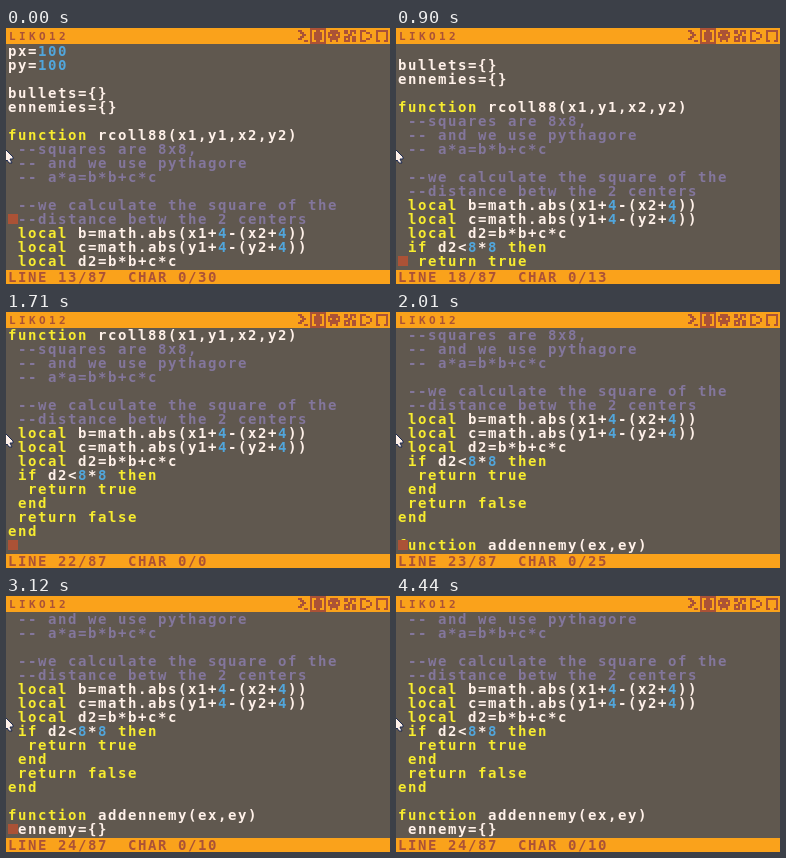
Animation of 384 by 256 pixels, one loop 4530 ms. Source, as an HTML page:

```html
<!DOCTYPE html>
<html lang="en">
<head>
<meta charset="utf-8">
<title>Code editor</title>
<style>
  html, body { margin: 0; width: 100%; height: 100%; overflow: hidden; background: #60584f; }
  svg { display: block; }
  text {
    font: bold 14px "DejaVu Sans Mono", monospace;
    letter-spacing: calc(10px - 1ch);
    white-space: pre;
    fill: #fff1e9;
  }
  .bar { fill: #faa21b; }
  .brown { fill: #ab5236; }
  .comment { fill: #83769c; }
  .keyword { fill: #f7ec2f; }
  .number { fill: #51a6dc; }
  .title { font-size: 11px; }
  .icons { fill: none; stroke: #ab5236; }
  .icons .active { stroke: #faa21b; }
</style>
</head>
<body>
<svg width="384" height="256" viewBox="0 0 384 256">
  <rect width="384" height="256" fill="#60584f"/>
  <g id="code"></g>
  <rect id="cursor" class="brown" x="2" width="10" height="10" shape-rendering="crispEdges"/>

  <rect class="bar" width="384" height="16"/>
  <text class="title brown" x="3" y="12">LIKO<tspan x="43">12</tspan></text>
  <g class="icons" transform="scale(2)" shape-rendering="crispEdges">
    <path d="M146 1.5h2m-1 1h2m-1 1h2m-3 1h2m-3 1h2m1 1h2"/>
    <rect class="brown" x="152" width="8" height="8" stroke="none"/>
    <path class="active" d="M155 1.5h-1.5v5h1.5M157 1.5h1.5v5h-1.5"/>
    <path d="M162 1.5h4M161 2.5h6M161 3.5h1m1 0h2m1 0h1M161 4.5h6M162 5.5h4M162 6.5h1m2 0h1"/>
    <path d="M169 1.5h2m1 0h3M169 2.5h2m1 0h1m1 0h1M171 3.5h2M169 4.5h3m1 0h2M169 5.5h1m1 0h1m1 0h2M169 6.5h3m1 0h2"/>
    <path d="M177.5 1v6M178 1.5h2m0 1h2m0 1h1m-1 1h1m-3 1h2m-4 1h2"/>
    <path d="M185 1.5h6M185.5 2v5M190.5 2v5M186 6.5h1m2 0h1"/>
  </g>

  <rect class="bar" y="242" width="384" height="14"/>
  <text id="status" class="brown" x="2" y="254"></text>
  <path d="M-2 120L7 129V131H4L6 135H3L1 132L-2 135Z" fill="#fff1e9" stroke="#1c2b53"/>
</svg>
<script>
const LINES = `px=100
py=100

bullets={}
ennemies={}

function rcoll88(x1,y1,x2,y2)
 --squares are 8x8,
 -- and we use pythagore
 -- a*a=b*b+c*c

 --we calculate the square of the
 --distance betw the 2 centers
 local b=math.abs(x1+4-(x2+4))
 local c=math.abs(y1+4-(y2+4))
 local d2=b*b+c*c
 if d2<8*8 then
  return true
 end
 return false
end

function addennemy(ex,ey)
 ennemy={}`.split("\n");

const DURATION = 4530, TOTAL_LINES = 87, ROWS = 16, ROW_HEIGHT = 14;
const FIRST_LINE = 13;
const MOVES = [450, 810, 840, 870, 900, 990, 1230, 1470, 1710, 2010, 2340];
const BLINKS = [270, 450, 2670, 3120, 3540, 3990, 4440];

const TOKEN = /(--.*)|\b(function|local|if|then|return|true|false|end)\b|\b(\d+)\b/g;
const highlight = line => line.replace("<", "&lt;").replace(TOKEN, (token, comment, keyword) =>
  `<tspan class="${comment ? "comment" : keyword ? "keyword" : "number"}">${token}</tspan>`);

const byId = id => document.getElementById(id);
const code = byId("code"), cursor = byId("cursor"), statusBar = byId("status");
code.innerHTML = LINES.map((line, i) =>
  `<text x="2" y="${28 + i * ROW_HEIGHT}">${highlight(line)}</text>`).join("");

const countPassed = (times, t) => times.filter(time => time <= t).length;
const show = (element, visible) =>
  element.setAttribute("visibility", visible ? "visible" : "hidden");

function draw(t) {
  const line = FIRST_LINE + countPassed(MOVES, t);
  const scroll = Math.max(0, line - ROWS);
  code.setAttribute("transform", `translate(0 ${-scroll * ROW_HEIGHT})`);
  [...code.children].forEach((row, i) => show(row, i >= scroll && i < scroll + ROWS));
  cursor.setAttribute("y", 18 + (line - 1 - scroll) * ROW_HEIGHT);
  show(cursor, countPassed(BLINKS, t) % 2 === 0);
  statusBar.textContent = `LINE ${line}/${TOTAL_LINES}  CHAR 0/${LINES[line - 1].length}`;
}

const start = performance.now();
function tick() {
  draw((performance.now() - start) % DURATION);
  requestAnimationFrame(tick);
}
tick();
</script>
</body>
</html>
```
